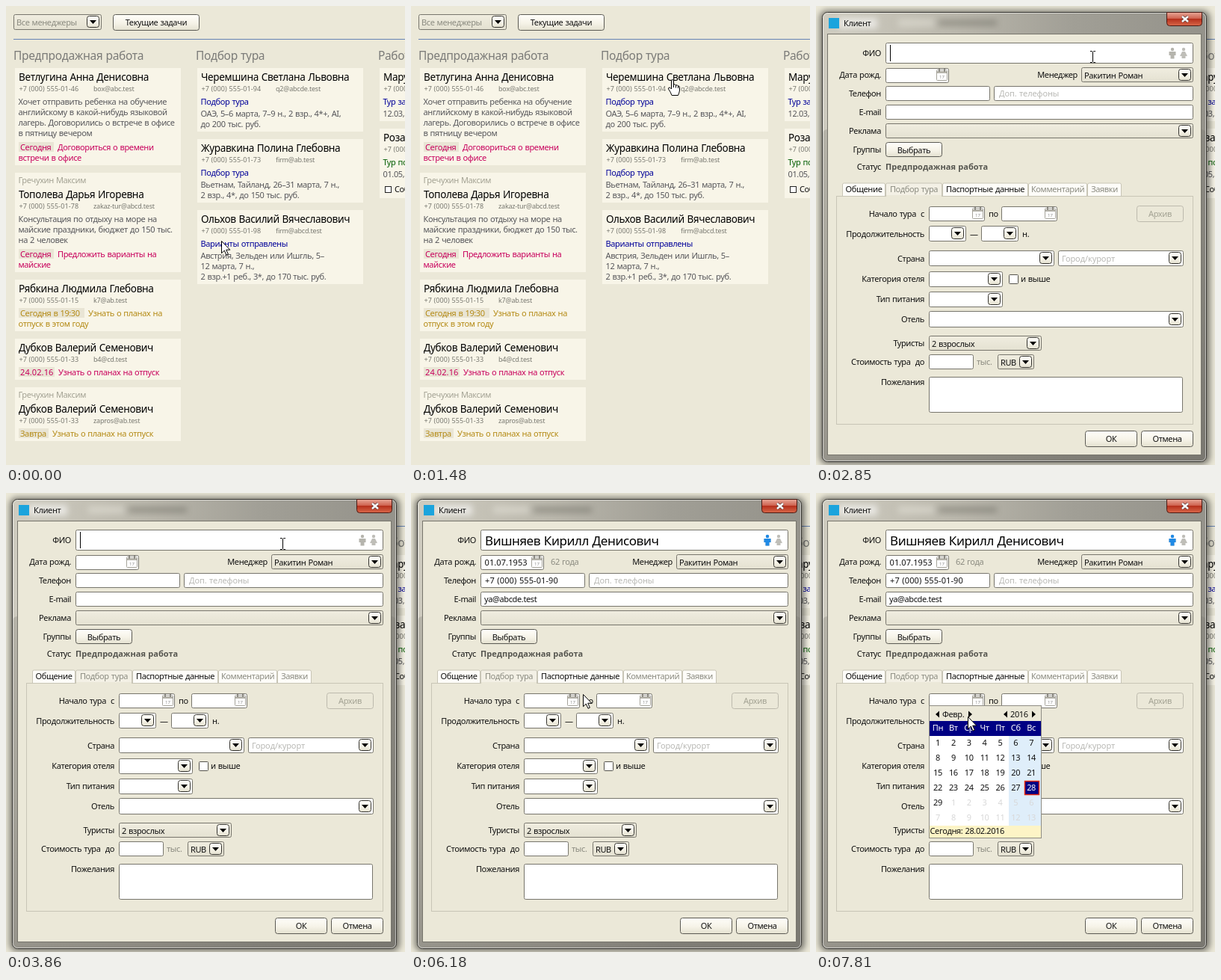
Animation, 534 px wide and 614 px high, one loop 8 s. Source, as an HTML page:

```html
<!DOCTYPE html>
<html lang="ru">
<head>
<meta charset="utf-8">
<title>Клиент</title>
<style>
html, body { margin: 0; width: 100%; height: 100%; overflow: hidden; background: #ebe8d8; }
svg { display: block; width: 534px; height: 614px; }
text { font: 11px "Noto Sans", "Open Sans", sans-serif; letter-spacing: -.38px; word-spacing: .6px; white-space: pre; fill: #111; }
.head { font-size: 15.5px; letter-spacing: -.35px; fill: #7b7b78; }
.name { font-size: 13.5px; letter-spacing: -.34px; fill: #000; }
.phone { font-size: 9px; letter-spacing: .12px; word-spacing: 0; fill: #77776f; }
.mail { font-size: 9px; letter-spacing: -.2px; fill: #77776f; }
.body { fill: #56565a; }
.link { fill: #000099; }
.done { fill: #005c00; }
.mgr { fill: #a3a293; }
.red { fill: #c8005c; }
.gold { fill: #b48a14; }
.num { letter-spacing: .1px; }
.hint { letter-spacing: -.1px; fill: #b9b9b5; }
.dim { fill: #8b8b80; }
.bold { font-weight: bold; letter-spacing: 0; fill: #55554f; }
.big { font-size: 17px; letter-spacing: -.4px; fill: #000; }
.white { fill: #fff; }
.next { fill: #d8d8d8; }
.tiny { font-size: 6px; letter-spacing: 0; fill: #888; }
.end { text-anchor: end; }
.mid { text-anchor: middle; }
</style>
</head>
<body>
<svg id="stage" viewBox="0 0 534 614"></svg>
<script>
const BG = '#ebe8d8', CARD = '#f8f5e8', NAVY = '#000084';

const text = (x, y, s, cls = '') => `<text x="${x}" y="${y}" class="${cls}">${s}</text>`;
const rect = (x, y, x2, y2, fill, extra = '') =>
  `<rect x="${x}" y="${y}" width="${x2 - x}" height="${y2 - y}" fill="${fill}" ${extra}/>`;
const path = (d, fill, extra = '') => `<path d="${d}" fill="${fill}" ${extra}/>`;
const group = (id, content, extra = '') => `<g id="${id}" ${extra}>${content}</g>`;

// Outlined box given by its outer pixel edges
const box = (x, y, x2, y2, fill = '#fff', line = '#77756c', r = 2) =>
  rect(x + .5, y + .5, x2 - .5, y2 - .5, fill, `rx="${r}" stroke="${line}"`);

const button = (x, y, x2, y2, s, off) =>
  box(x, y, x2, y2, off ? BG : 'url(#btn)', off ? '#bdbaad' : '#5b5a54', 3) +
  text((x + x2) / 2, y + 15, s, off ? 'mid mgr' : 'mid');

function combo(x, y, x2, y2, fill = '#fff') {
  const cx = x2 - 11.5, cy = Math.floor((y + y2) / 2);
  return box(x, y, x2, y2, fill) +
    box(x2 - 20, cy - 8, x2 - 3, cy + 8, 'url(#btn)', '#33322e', 3) +
    path(`M${cx - 4.5} ${cy - 2}h9l-4.500 5z`, '#000');
}

const calIcon = (x, y) =>
  box(x, y + 1, x + 15, y + 16, '#fff', '#a5a39a', 1) +
  rect(x + 1, y + 3, x + 14, y + 6, '#b5b3aa') +
  rect(x + 3, y, x + 5, y + 4, '#8d8b84') + rect(x + 10, y, x + 12, y + 4, '#8d8b84') +
  text(x + 7.5, y + 13, '17', 'tiny mid');

const dateField = (x, y, x2) => box(x, y, x2, y + 20) + calIcon(x2 - 17, y + 1);

const person = (x, color, skirt) =>
  `<circle cx="${x}" cy="58" r="2.2" fill="${color}"/>` + path(skirt
    ? `M${x - 2} 61h4l3 6h-2.500v3h-5v-3h-2.500z`
    : `M${x - 4.5} 61h9v5h-2v4.500h-5v-4.500h-2z`, color);

/* ---------- board ---------- */
function card(x, y, h, c) {
  let out = rect(x, y, x + 222, y + h, CARD);
  const left = x + 4.5;
  let base = y + 17;
  if (c.mgr) {
    out += text(left, y + 14, c.mgr, 'mgr');
    base = y + 34;
  }
  out += text(x + 5, base, c.name, 'name') +
    text(x + 5.5, base + 14, c.phone, 'phone') + text(x + 105, base + 14, c.mail, 'mail');
  let line = base + 32;
  if (c.link) {
    out += text(left, line, c.link, c.color || 'link');
    line += 16;
  }
  for (const s of c.body || []) {
    out += text(left, line, s, 'body');
    line += 14;
  }
  if (c.tag) {
    if (c.body) line += 5;
    const [s, w, first, second] = c.tag;
    out += rect(x + 5, line - 11, x + 5 + w, line + 2, '#e9e5d5') +
      text(x + 7, line, s, c.color + (/^\d/.test(s) ? ' num' : '')) +
      text(x + 10 + w, line, first, c.color) + text(left, line + 14, second || '', c.color);
  }
  return out;
}

const board = rect(0, 0, 534, 614, BG) +
  combo(10, 11, 128, 32, 'url(#beige)') + text(14, 26, 'Все менеджеры', 'dim') +
  button(143, 11, 259, 33, 'Текущие задачи') +
  rect(10, 44, 534, 45, '#6683b4') +
  text(10, 72, 'Предпродажная работа', 'head') +
  text(254, 72, 'Подбор тура', 'head') +
  text(498, 72, 'Работа', 'head') +
  card(12, 83, 130, {
    name: 'Ветлугина Анна Денисовна', phone: '+7 (000) 555-01-46', mail: 'box@abc.test',
    body: ['Хочет отправить ребенка на обучение', 'английскому в какой-нибудь языковой',
      'лагерь. Договорились о встрече в офисе', 'в пятницу вечером'],
    tag: ['Сегодня', 47, 'Договориться о времени', 'встречи в офисе'], color: 'red'
  }) +
  card(12, 223, 133, {
    mgr: 'Гречухин Максим', name: 'Тополева Дарья Игоревна',
    phone: '+7 (000) 555-01-78', mail: 'zakaz-tur@abcd.test',
    body: ['Консультация по отдыху на море на', 'майские праздники, бюджет до 150 тыс.', 'на 2 человек'],
    tag: ['Сегодня', 47, 'Предложить варианты на', 'майские'], color: 'red'
  }) +
  card(12, 366, 69, {
    name: 'Рябкина Людмила Глебовна', phone: '+7 (000) 555-01-15', mail: 'k7@ab.test',
    tag: ['Сегодня в 19:30', 88, 'Узнать о планах на', 'отпуск в этом году'], color: 'gold'
  }) +
  card(12, 445, 55, {
    name: 'Дубков Валерий Семенович', phone: '+7 (000) 555-01-33', mail: 'b4@cd.test',
    tag: ['24.02.16', 48, 'Узнать о планах на отпуск'], color: 'red'
  }) +
  card(12, 510, 72, {
    mgr: 'Гречухин Максим', name: 'Дубков Валерий Семенович',
    phone: '+7 (000) 555-01-33', mail: 'zapros@ab.test',
    tag: ['Завтра', 40, 'Узнать о планах на отпуск'], color: 'gold'
  }) +
  card(256, 83, 85, {
    name: 'Черемшина Светлана Львовна', phone: '+7 (000) 555-01-94', mail: 'q2@abcde.test',
    link: 'Подбор тура', body: ['ОАЭ, 5–6 марта, 7–9 н., 2 взр., 4*+, AI,', 'до 200 тыс. руб.']
  }) +
  card(256, 178, 85, {
    name: 'Журавкина Полина Глебовна', phone: '+7 (000) 555-01-73', mail: 'firm@ab.test',
    link: 'Подбор тура', body: ['Вьетнам, Тайланд, 26–31 марта, 7 н.,', '2 взр., 4*, до 150 тыс. руб.']
  }) +
  card(256, 273, 99, {
    name: 'Ольхов Василий Вячеславович', phone: '+7 (000) 555-01-98', mail: 'firm@abcd.test',
    link: 'Варианты отправлены',
    body: ['Австрия, Зельден или Ишгль, 5–', '12 марта, 7 н.,', '2 взр.+1 реб., 3*, до 170 тыс. руб.']
  }) +
  card(500, 83, 71, {
    name: 'Марусин', phone: '+7 (000)', mail: '', link: 'Тур забронирован', body: ['12.03, 7 н.']
  }) +
  card(500, 164, 93, {
    name: 'Розанин', phone: '+7 (000)', mail: '', link: 'Тур подтвержден', color: 'done', body: ['01.05, 9 н.']
  }) +
  box(507, 241, 516, 250, '#fff', '#222', 0) + text(520, 249, 'Собрать');

const plus = path('M366 60h4v4h5v4h-5v5h-4v-5h-5v-4h5z', '#c6c4b9');

/* ---------- dialog ---------- */
const label = (y, s, x = 87) => text(x, y, s, 'end');

const tabs = [[35, 93, 'Общение', 1], [93, 169, 'Подбор тура'], [169, 284, 'Паспортные данные', 1],
  [284, 363, 'Комментарий'], [363, 409, 'Заявки']]
  .map(([x, x2, s, on], i) =>
    path(`M${x + .5} 254v-15q0-2 2-2H${x2 - 2.5}q2 0 2 2v15`,
      i === 1 ? '#f3f0e5' : '#fdfcf8', 'stroke="#c8c5b6"') +
    text((x + x2) / 2, 249, s, on ? 'mid' : 'mid dim')).join('');

const frame =
  rect(5, 6, 527, 613, '#000', 'rx="9" opacity=".5" filter="url(#soft)"') +
  rect(8.5, 8.5, 522.5, 609.5, 'url(#glass)', 'rx="7" stroke="#35342f"') +
  rect(9, 165, 522, 609, 'url(#shade)', 'rx="6"') +
  rect(9.5, 9.5, 521.5, 608.5, 'none', 'rx="6" stroke="#fff" stroke-opacity=".55"') +
  rect(110, 17, 158, 28, '#efede3', 'opacity=".4" filter="url(#soft)"') +
  rect(164, 19, 242, 26, '#55534b', 'opacity=".4" filter="url(#soft)"') +
  rect(30, 16, 82, 30, '#fff', 'opacity=".6" filter="url(#soft)"') +
  rect(17, 16, 31, 30, '#1ba4dd') + text(37, 27, 'Клиент') +
  path('M469.500 8.500h47v14q0 4-4 4h-39q-4 0-4-4z', 'url(#close)', 'stroke="#4a1a14"') +
  path('M490 14l8 7m0-7l-8 7', 'none', 'stroke="#5a3a38" stroke-width="4"') +
  path('M490 14l8 7m0-7l-8 7', 'none', 'stroke="#fff" stroke-width="2.500"') +
  rect(15.5, 37.5, 515.5, 600.5, BG, 'stroke="#77756c"');

const form =
  label(67, 'ФИО') + box(93, 49, 505, 77) + person(477, '#b5b4ad') + person(492, '#bfbeb8', true) +
  label(96, 'Дата рожд.') + dateField(93, 83, 178) +
  label(96, 'Менеджер', 350) + combo(355, 82, 505, 102, 'url(#beige)') + text(359, 97, 'Ракитин Роман') +
  label(121, 'Телефон') + box(93, 107, 233, 127) +
  box(238, 107, 505, 127) + text(245, 121, 'Доп. телефоны', 'hint') +
  label(146, 'E-mail') + box(93, 132, 505, 152) +
  label(171, 'Реклама') + combo(93, 157, 505, 177, 'url(#beige)') +
  label(196, 'Группы') + button(93, 182, 169, 202, 'Выбрать') +
  label(219, 'Статус') + text(93, 219, 'Предпродажная работа', 'bold') +
  box(27, 254, 505, 560, BG, '#c8c5b6', 0) + tabs + rect(94, 253, 168, 256, BG) +
  label(282, 'Начало тура  с', 145) + dateField(151, 268, 226) + text(231, 282, 'по') +
  dateField(248, 268, 323) + button(429, 267, 492, 289, 'Архив', true) +
  label(309, 'Продолжительность', 145) + combo(151, 294, 201, 315) + text(206, 309, '—') +
  combo(221, 294, 271, 315) + text(276, 309, 'н.') +
  label(342, 'Страна', 145) + combo(151, 327, 319, 348) +
  combo(324, 327, 492, 348) + text(329, 342, 'Город/курорт', 'hint') +
  label(369, 'Категория отеля', 145) + combo(151, 355, 250, 376) +
  box(258, 359, 271, 372, '#fff', '#55534c', 1) + text(274, 369, 'и выше') +
  label(396, 'Тип питания', 145) + combo(151, 382, 250, 403) +
  label(423, 'Отель', 145) + combo(151, 408, 492, 430) +
  label(455, 'Туристы', 145) + combo(151, 441, 302, 461, 'url(#beige)') + text(155, 456, '2 взрослых') +
  label(480, 'Стоимость тура  до', 145) + box(151, 466, 211, 486) + text(215, 480, 'тыс.', 'dim') +
  combo(243, 466, 292, 486, 'url(#beige)') + text(247, 481, 'RUB') +
  label(507, 'Пожелания', 145) + box(151, 496, 491, 544) +
  button(360, 568, 430, 590, 'ОК') + button(435, 568, 505, 590, 'Отмена');

const filled = text(99, 70, 'Вишняев Кирилл Денисович', 'big') + person(477, '#1f8ae6') +
  text(98.5, 97, '01.07.1953', 'num') + text(187, 96, '62 года', 'dim') +
  text(99, 121, '+7 (000) 555-01-90', 'num') + text(98, 146, 'ya@abcde.test');

/* ---------- date picker ---------- */
function picker() {
  const col = i => 163 + 20.85 * i;
  const arrow = (x, d) => path(`M${x} 296l${-d * 5}-4.500v9z`, '#000');
  let out = rect(151.5, 284.5, 301.5, 461.5, '#fff', 'stroke="#8f8d84"') +
    rect(152, 285, 301, 305, BG) + rect(152, 305, 301, 325, NAVY) +
    rect(258, 325, 301, 445, '#dfeefa') + rect(152, 445, 301, 461, '#fdf4c6') +
    arrow(160, -1) + text(169, 300, 'Февр.') + arrow(209, 1) +
    arrow(251, -1) + text(260, 300, '2016') + arrow(294, 1) +
    text(152.5, 456, 'Сегодня: 28.02.2016');
  'Пн Вт Ср Чт Пт Сб Вс'.split(' ').forEach((s, i) => out += text(col(i), 318, s, 'mid white'));
  out += rect(279.5, 385.5, 298.5, 403.5, NAVY, 'stroke="#e82a10" stroke-width="1.500"');
  for (let i = 0; i < 42; i++) {
    const cls = i === 27 ? 'white' : i > 28 ? 'next' : '';
    out += text(col(i % 7), 338 + 20 * Math.floor(i / 7), i % 29 + 1, 'mid ' + cls);
  }
  return out;
}

/* ---------- pointers, origin at the hot spot ---------- */
const line = 'stroke="#000" stroke-linejoin="round"';
const pointers = {
  arrow: path('M.5 .5v16.200l3.800-3.600 2.700 6.100 2.400-1.100-2.700-5.900h5.100z', '#fff', line),
  hand: path('M-1.500 1.500Q0-.5 1.500 1.500V7Q3.500 6 4.500 8Q6.500 7 7.500 9Q9.500 8.500 9.500 11V15Q9 18 7.500 21.500H-1' +
    'Q-2.500 17-5.500 13Q-5.500 10-3 11.500L-1.500 13ZM1.500 7v4M4.500 8v3.500M7.500 9v3', '#fff', line),
  beam: path('M-3.500-7.500h2.500l1 1 1-1h2.500M-3.500 7.500h2.500l1-1 1 1h2.500M0-6.500v13', 'none', 'stroke="#000"')
};

const stops = (...list) => list.map(([at, c]) => `<stop offset="${at}" stop-color="${c}"/>`).join('');
const grad = (id, dir, ...list) => `<linearGradient id="${id}" x2="${dir ? 0 : 1}" y2="${dir}">${stops(...list)}</linearGradient>`;

document.getElementById('stage').innerHTML = '<defs>' +
  grad('btn', 1, [0, '#fffefa'], [.55, '#f6f3e8'], [1, '#e4e1d0']) +
  grad('beige', 1, [0, '#f0ede0'], [1, '#e4e1d1']) +
  grad('glass', 0, [0, '#cfccc0'], [.35, '#b9b6ab'], [.65, '#a19f96'], [1, '#94928a']) +
  grad('shade', 1, [0, '#6f6d6640'], [1, '#5f5d5780']) +
  grad('close', 1, [0, '#e8a898'], [.45, '#cf6350'], [.5, '#b5301c'], [1, '#d9684a']) +
  '<filter id="soft" x="-30%" y="-80%" width="160%" height="260%"><feGaussianBlur stdDeviation="4"/></filter></defs>' +
  board + group('plus', plus) +
  group('dialog', frame + form + group('filled', filled) + group('picker', picker())) +
  group('caret', rect(0, 52, 1, 74, '#000')) +
  Object.entries(pointers).map(([id, p]) => group(id, p)).join('');

/* ---------- timeline ---------- */
const LOOP = 8000, OPEN = 2850, FILL = 4440, PICK = 6850;
const moves = [
  [0, 'arrow', 288, 314], [120, 'arrow', 247, 350], [240, 'arrow', 248, 357], [390, 'arrow', 249, 356],
  [670, 'arrow', 255, 348], [790, 'arrow', 263, 336], [940, 'arrow', 258, 338], [1060, 'arrow', 286, 268],
  [1180, 'hand', 321, 182], [1330, 'arrow', 329, 125], [1480, 'hand', 350, 98], [1600, 'arrow', 364, 79],
  [1720, 'hand', 370, 70], [1870, 'hand', 370, 68], [1990, 'hand', 370, 67], [2600, 'beam', 370.5, 68],
  [5370, 'beam', 370.5, 72], [5490, 'beam', 367, 92], [5610, 'beam', 362, 124], [5760, 'arrow', 345, 170],
  [5910, 'arrow', 314, 209], [6060, 'arrow', 270, 241], [6180, 'arrow', 230, 269], [6320, 'arrow', 220, 276],
  [6440, 'arrow', 214, 279], [PICK, 'arrow', 214, 281], [6970, 'arrow', 214, 282], [7250, 'arrow', 214, 303],
  [7400, 'arrow', 213, 308], [7520, 'arrow', 213, 301], [7670, 'arrow', 204, 299], [7810, 'arrow', 203, 299]
];
const blinks = [[OPEN, 3280], [3860, 4300], [FILL, 4970], [5370, 5910], [6440, PICK]];

const el = id => document.getElementById(id);
const show = (id, on) => el(id).setAttribute('visibility', on ? 'inherit' : 'hidden');
const place = (id, x, y) => el(id).setAttribute('transform', `translate(${x} ${y})`);
const start = performance.now();

function draw() {
  const t = (performance.now() - start) % LOOP;
  show('plus', t >= 1720 && t < OPEN);
  show('dialog', t >= OPEN);
  show('filled', t >= FILL);
  show('picker', t >= PICK);
  // Children set to "inherit" follow the dialog's own visibility
  show('caret', blinks.some(([a, b]) => t >= a && t < b));
  place('caret', t < FILL ? 99 : 329, 0);
  const [, kind, x, y] = moves.filter(m => m[0] <= t).pop();
  for (const id in pointers) show(id, id === kind);
  place(kind, x, y);
  requestAnimationFrame(draw);
}
draw();
</script>
</body>
</html>
```
